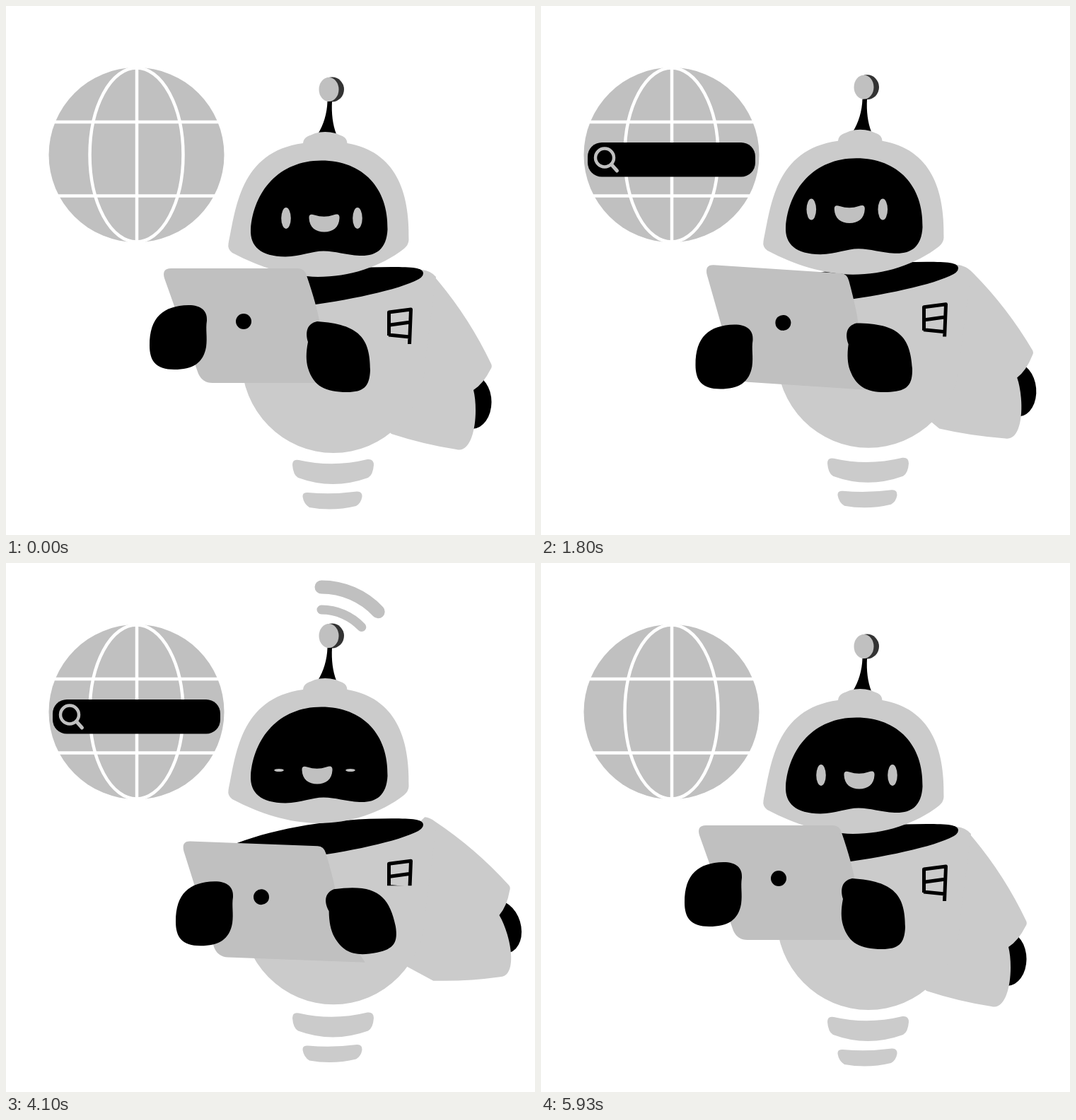
Write an HTML page with a canvas that moves like this. It is 748 by 748 pixels and loops after 6010 ms.

```html
<!DOCTYPE html>
<html lang="en">
<head>
<meta charset="utf-8">
<title>Robot browsing</title>
<style>
html, body { margin: 0; width: 100%; height: 100%; overflow: hidden; background: #fff; }
canvas { display: block; width: 748px; height: 748px; }
</style>
</head>
<body>
<canvas id="stage" width="748" height="748"></canvas>
<script>
const ctx = document.getElementById('stage').getContext('2d');
const LOOP = 6010;
const BODY = '#cbcbcb', GREY = '#c0c0c0', BLACK = '#000', WHITE = '#fff';

// Offsets from the resting pose; arm and tilt are degrees, cut hides the badge below it
const REST = { start: 4650, end: 4900, laptop: [0, 0], tilt: 0, left: [0, 0], right: [0, 0], face: [0, 0], arm: 0, cut: 478 };
const RAISED = { start: 250, end: 500, laptop: [29, -28], tilt: 2.1, left: [20, -34], right: [27, -23], face: [-11, 8], arm: -7.6, cut: 444 };
const LOWERED = { start: 1600, end: 1850, laptop: [4, 13], tilt: 3.9, left: [15, 42], right: [7, 11], face: [-14, -11], arm: -4.8, cut: 478 };
const ASIDE = { start: 3035, end: 3235, laptop: [25, 34], tilt: 2.1, left: [37, 35], right: [33, 16], face: [-10, 8], arm: -16.7, cut: 464 };
const MOVES = [RAISED, LOWERED, ASIDE, REST];

const ramp = (t, a, b) => Math.max(0, Math.min(1, (t - a) / (b - a)));
const wave = p => (1 - Math.cos(Math.PI * p)) / 2;
const swell = (t, a, b, c, d) => wave(ramp(t, a, b)) * (1 - wave(ramp(t, c, d)));
const mix = (a, b, p) => Array.isArray(a) ? a.map((v, i) => mix(v, b[i], p)) : a + (b - a) * p;

function poseAt(t) {
  const next = MOVES.findLast(m => t >= m.start) || REST;
  if (t < RAISED.start) return REST;
  const prev = MOVES[(MOVES.indexOf(next) + 3) % 4];
  const p = wave(ramp(t, next.start, next.end));
  const pose = {};
  for (const key in next) pose[key] = mix(prev[key], next[key], p);
  return pose;
}

// Draws with an offset and, if given, a turn about a pivot
function place(x, y, draw, deg = 0, px = 0, py = 0) {
  ctx.save();
  ctx.translate(x + px, y + py);
  ctx.rotate(deg * Math.PI / 180);
  ctx.translate(-px, -py);
  draw();
  ctx.restore();
}

function shape(d, fill) {
  ctx.fillStyle = fill;
  ctx.fill(new Path2D(d));
}

function line(d, color, width) {
  ctx.strokeStyle = color;
  ctx.lineWidth = width;
  ctx.stroke(new Path2D(d));
}

function oval(x, y, rx, ry) {
  ctx.beginPath();
  ctx.ellipse(x, y, rx, ry, 0, 0, 2 * Math.PI);
}

function disc(x, y, rx, ry, fill) {
  oval(x, y, rx, ry);
  ctx.fillStyle = fill;
  ctx.fill();
}

function hoop(x, y, rx, ry, color, width) {
  oval(x, y, rx, ry);
  ctx.strokeStyle = color;
  ctx.lineWidth = width;
  ctx.stroke();
}

function globe() {
  disc(184.5, 210.5, 124, 123.5, GREY);
  hoop(184.5, 210.5, 66, 123, WHITE, 4.5);
  line('M185 84V338M56 164H314M56 268.5H314', WHITE, 4.5);
}

function searchBar(scale) {
  if (scale <= 0) return;
  ctx.save();
  ctx.translate(184.5, 217);
  ctx.scale(scale, 1);
  ctx.beginPath();
  ctx.roundRect(-118.5, -24, 237, 48.5, 20);
  ctx.fillStyle = BLACK;
  ctx.fill();
  ctx.lineCap = 'round';
  hoop(-94.5, -2.5, 13, 13, GREY, 4.5);
  line('M-85 7L-77 16', GREY, 5);
  ctx.restore();
}

function rings() {
  shape('M405 649Q405 640 414 642Q462 653 511 641Q520 640 520 649Q519 663 512 667Q462 685 413 667Q406 663 405 649Z', BODY);
  shape('M419.5 694Q419 687 427 688Q462 691 496 686.5Q504 686 503.5 694Q502 703 495 707Q462 715 429 709Q421 704 419.5 694Z', BODY);
}

function arm() {
  disc(659.5, 560, 27, 38, BLACK);
  shape('M560 400L600 380Q606 382 612 390Q656 443 686 506Q688 510 685 514Q675 534 661 543Q664 555 664 572C664 602 655 632 637 627Q591 620 545 605L500 560Z', BODY);
}

function badge(cut) {
  ctx.save();
  ctx.beginPath();
  ctx.rect(530, 415, 60, cut - 415);
  ctx.clip();
  ctx.lineJoin = 'round';
  line('M541.5 466V433L572.5 429L570.5 478M543 451L572 447M541 465L571 468', BLACK, 5);
  ctx.restore();
}

function torso(pose) {
  place(0, 0, arm, pose.arm, 552, 400);
  shape('M333 500A130 132 0 0 0 593 500L608 383Q600 374 588 373L400 412L345 440Z', BODY);
  shape('M590 378C590 370 575 369 545 369C460 369 385 382 326 404L400 427C470 419 545 404 578 389Q590 384 590 378Z', BLACK);
  badge(pose.cut);
}

function signal(t) {
  const s = t % 3000;
  const arc = (r, width) => {
    ctx.beginPath();
    ctx.arc(446, 159, r, -Math.PI / 2, -Math.PI * 0.24);
    ctx.lineCap = 'round';
    ctx.strokeStyle = GREY;
    ctx.lineWidth = width;
    ctx.stroke();
  };
  if (s >= 600 && s < 1750) arc(78, 13);
  if (s >= 750 && s < 1700) arc(110, 19);
}

// The eyes close once a second
function face(t) {
  const open = 2 + 13 * ramp(Math.abs(t % 1000 - 100), 0, 80);
  disc(396, 300, 6.8, open, GREY);
  disc(497, 300, 6.8, open, GREY);
  shape('M428.5 300C428 295 431 293.5 436 295.5Q450 300 463 295.5C469 293 472 295 471.5 300C471 313 462 319.5 450 319.5C438 319.5 429 313 428.5 300Z', GREY);
}

function head(t, pose) {
  signal(t);
  disc(461, 118, 17, 17.5, '#333');
  disc(456.5, 118, 14, 17, GREY);
  shape('M454.5 135H461C460 152 462 168 467 181H441C449 168 454 152 454.5 135Z', BLACK);
  shape('M420 194C421 184 429 184 437 180Q451 176 466 180C474 184 482 184 482.5 194C551 206 571 262 569.5 331Q569 338 563 343C530 369 485 383 441 383C399 382 360 370 320 349Q313 344 314.5 336C325 288 330 206 420 194Z', BODY);
  shape('M346 316C350 262 386 218.5 446 218.5C505 218.5 541 258 539.5 316C538 345 522 354 500 353C480 352 466 346.5 449 346.5C432 346.5 418 354 395 354.5C360 354 345 340 346 316Z', BLACK);
  place(...pose.face, () => face(t));
}

function laptop() {
  shape('M233 371H413Q422 371 425 381Q440 425 444 450Q455 490 486 533H292Q278 533 272 520L224 385Q220 371 233 371Z', GREY);
  disc(336, 446, 11, 11, BLACK);
}

function leftHand() {
  shape('M203 480C203 440 222 424 258 423C276 423 285 431 284 445C282 458 285 468 283 482C279 505 264 514 238 514C212 514 203 502 203 480Z', BLACK);
}

function rightHand() {
  shape('M440 446C425 449 423 462 427 475C424 490 424 502 427 512C435 538 452 546 482 546C506 546 514 538 515 515C515 470 500 450 440 446Z', BLACK);
}

function draw(t) {
  const pose = poseAt(t);
  const bob = -11 * wave(t / 3000);
  const grow = 1 - (1 - ramp(t, 300, 525)) ** 2;
  const shrink = ramp(t, 5000, 5225) ** 2;

  ctx.fillStyle = WHITE;
  ctx.fillRect(0, 0, 748, 748);
  globe();
  searchBar(grow - shrink);
  place(0, -8 * swell(t, 1000, 3250, 3250, 5500), rings);
  place(0, bob, () => torso(pose));
  place(0, -15 * swell(t, 1000, 3600, 4200, 5950), () => head(t, pose));
  place(0, bob, () => {
    place(...pose.laptop, laptop, pose.tilt, 336, 446);
    place(...pose.left, leftHand);
    place(...pose.right, rightHand, pose.arm * 0.7, 469.5, 496);
  });
}

// Twenty pictures a second, held for 30 and 70 ms in turn
function stepTime(ms) {
  const step = 2 * Math.floor(ms / 100) + (ms % 100 >= 30 ? 1 : 0);
  return 50 * Math.min(119, step);
}

const start = performance.now();
function tick() {
  draw(stepTime((performance.now() - start) % LOOP));
  requestAnimationFrame(tick);
}
tick();
</script>
</body>
</html>
```
